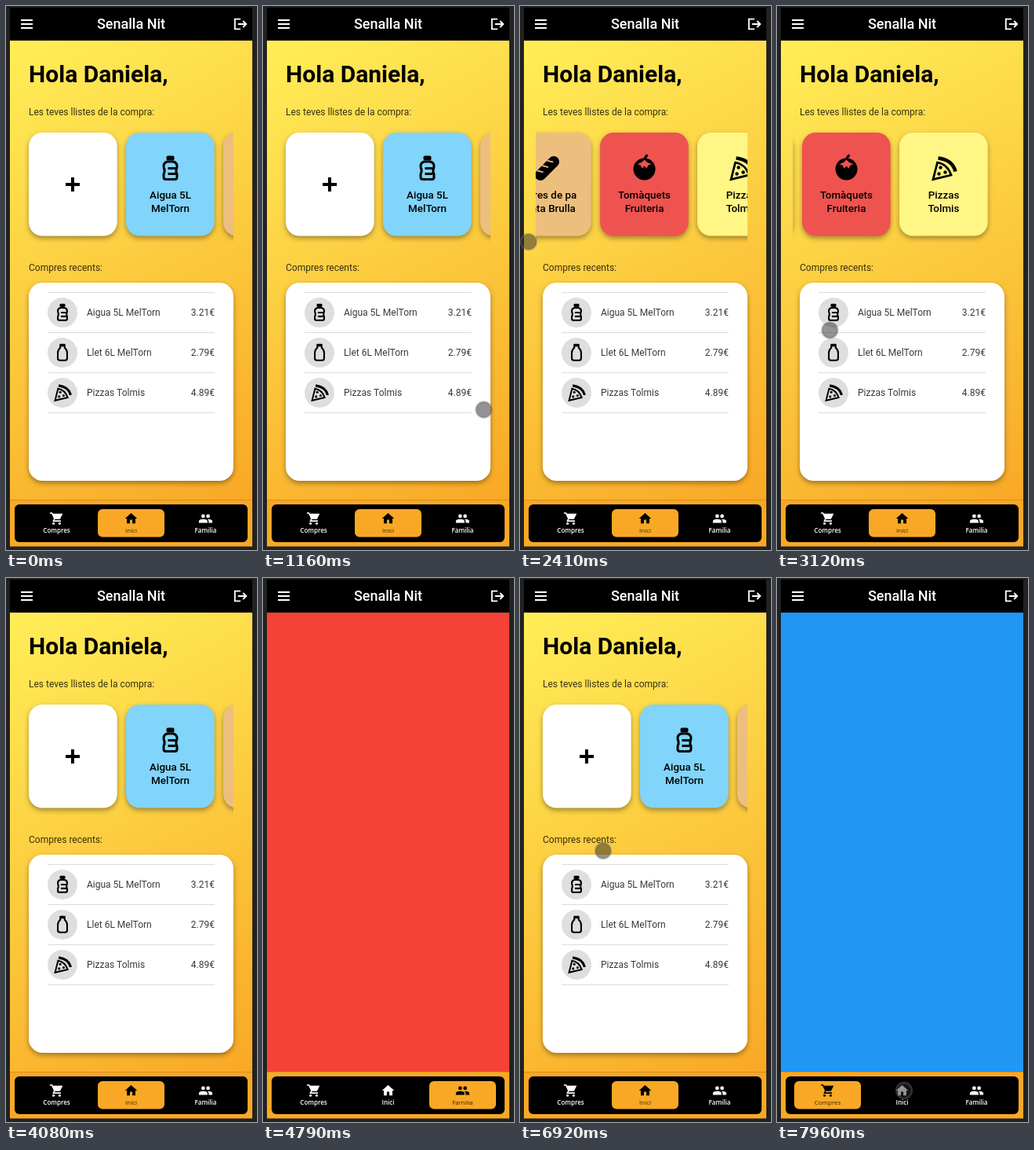
Animation, 320 px wide and 692 px high, one loop 8 s. Source, as an HTML page with a canvas:

```html
<!DOCTYPE html>
<html lang="ca">
<head>
<meta charset="utf-8">
<title>Llista de la compra</title>
<style>
  html, body { margin: 0; width: 100%; height: 100%; overflow: hidden; background: #222; }
  canvas { display: block; width: 100vw; height: 100vh; }
</style>
</head>
<body>
<canvas id="stage"></canvas>
<script>
const W = 320, H = 692, LOOP = 8000;
const LEFT = 5, TOP = 44, PAGE_W = 309, PAGE_H = 584;
const AMBER = '#f9a825', INK = 'rgba(0,0,0,.78)';
const SMALL = '12px Roboto, sans-serif';
const canvas = document.getElementById('stage');
const ctx = canvas.getContext('2d');
const dpr = window.devicePixelRatio || 1;
canvas.width = W * dpr;
canvas.height = H * dpr;

// Interface icons, drawn in a 24 px box
const ICONS = {
  cart() {
    stroke('M1 3H4.3L8.6 12L6.8 16H19', 2);
    fill('M5 4H22L17.5 13H8.6Z');
    dot(7, 20, 2);
    dot(17, 20, 2);
  },
  home() { fill('M10 20V14H14V20H19V12H22L12 3L2 12H5V20Z'); },
  people() {
    dot(8, 8, 3);
    dot(16, 8, 3);
    fill('M1 19V16.5Q1 13 8 13T15 16.5V19Z');
    fill('M17 19V16.5Q17 14.5 15 13Q23 13 23 16.5V19Z');
  },
  exit() {
    stroke('M12 4H3V20H12', 2.4);
    stroke('M8 12H20M16 7L21 12L16 17', 2.4);
  },
  menu() { stroke('M3 6H21M3 12H21M3 18H21', 2.2); }
};

// Product drawings, centred on 0,0 in a 32 px box
const PRODUCTS = {
  water() {
    rounded(-5, -16, 10, 6, 2, '#000');
    mirrored('M0-8.5H-4Q-8.500-7-8.500-3Q-8.500 0-7.500 1V5Q-8.500 6-8.500 8V11Q-8.500 14-5.500 14H0');
    stroke('M-3 0H7M-3 7H7', 3);
  },
  milk() {
    rounded(-5.5, -16, 11, 5, 2, '#000');
    mirrored('M-4-12V-9Q-8.500-5-8.500 0V10Q-8.500 14-4.500 14H0');
  },
  pizza() {
    stroke('M-7-13Q11-11 15 4', 4.5);
    stroke('M-8-7.500Q5-5 9.500 8.500L-13.500 14Z', 2.8);
    dot(-4, -1, 2.2);
    dot(2, 5, 2.2);
    dot(-6, 7, 2.2);
  },
  bread(back) {
    ctx.rotate(-Math.PI / 4);
    rounded(-19, -7, 38, 14, 7, '#000');
    ctx.strokeStyle = back;
    for (let x = -9; x <= 9; x += 9) stroke(`M${x - 2}-7L${x + 2} 0`, 1.8);
  },
  tomato(back) {
    dot(0, 1, 14);
    stroke('M0-9Q0-14 4-17', 3);
    ctx.fillStyle = back;
    fill('M-9-5L-3-8L0-11L3-8L9-5L5-4L3 0L0-3L-3 0L-5-4Z');
  }
};

const CARDS = [
  { color: '#fff' },
  { color: '#81d4fa', icon: 'water', lines: ['Aigua 5L', 'MelTorn'] },
  { color: '#edbf7f', icon: 'bread', lines: ['Barres de pa', 'Santa Brulla'] },
  { color: '#ef5350', icon: 'tomato', lines: ['Tomàquets', 'Fruiteria'] },
  { color: '#fff685', icon: 'pizza', lines: ['Pizzas', 'Tolmis'] }
];
const RECENT = [
  ['water', 'Aigua 5L MelTorn', '3.21€'],
  ['milk', 'Llet 6L MelTorn', '2.79€'],
  ['pizza', 'Pizzas Tolmis', '4.89€']
];
const TABS = [['cart', 'Compres'], ['home', 'Inici'], ['people', 'Familia']];

// Moves: start, duration, then the values to reach
const SCROLL = [[1560, 150, 80], [2010, 790, 369], [3620, 460, 0]];
const PAGE = [[4340, 450, 2], [6190, 450, 1], [7020, 450, 0]];
const TOUCHES = [
  { from: [282, 516], end: 3620, moves: [
    [1160, 190, 235, 283], [1560, 150, 140, 279], [2010, 240, 11, 300],
    [2960, 160, 67, 412], [3120, 360, 129, 483]] },
  { from: [303, 340], end: 4640, moves: [[4340, 250, 11, 345]] },
  { from: [11, 342], end: LOOP, moves: [
    [5340, 800, 180, 342], [6190, 250, 309, 345], [6600, 320, 106, 347],
    [7020, 250, 309, 335], [7480, 340, 186, 625], [7820, 140, 162, 652]] }
];

const easeOut = u => 1 - (1 - u) ** 2;

function glide(from, moves, t) {
  return moves.reduce((now, [start, time, ...to]) => {
    const u = easeOut(Math.min(1, Math.max(0, (t - start) / time)));
    return now.map((v, i) => v + (to[i] - v) * u);
  }, from);
}

function rect(x, y, w, h, color) {
  ctx.fillStyle = color;
  ctx.fillRect(x, y, w, h);
}

function rounded(x, y, w, h, r, color) {
  ctx.fillStyle = color;
  ctx.beginPath();
  ctx.roundRect(x, y, w, h, r);
  ctx.fill();
}

function panel(x, y, w, h, color) {
  ctx.save();
  ctx.shadowColor = 'rgba(0,0,0,.36)';
  ctx.shadowBlur = 6 * dpr;
  ctx.shadowOffsetY = 3 * dpr;
  rounded(x, y, w, h, 17.5, color);
  ctx.restore();
}

function dot(x, y, r) {
  ctx.beginPath();
  ctx.arc(x, y, r, 0, 7);
  ctx.fill();
}

function fill(path) {
  ctx.fill(new Path2D(path));
}

function stroke(path, width) {
  ctx.lineWidth = width;
  ctx.stroke(new Path2D(path));
}

function mirrored(path) {
  stroke(path, 3);
  ctx.scale(-1, 1);
  stroke(path, 3);
  ctx.scale(-1, 1);
}

function sprite(drawing, x, y, scale, origin, color, back) {
  ctx.save();
  ctx.translate(x, y);
  ctx.scale(scale, scale);
  ctx.translate(-origin, -origin);
  ctx.fillStyle = ctx.strokeStyle = color;
  drawing(back);
  ctx.restore();
}

function icon(name, x, y, scale, color) {
  sprite(ICONS[name], x, y, scale, 12, color);
}

function product(name, x, y, scale, back) {
  sprite(PRODUCTS[name], x, y, scale, 0, '#000', back);
}

function label(str, x, y, font, color = '#000', align = 'left') {
  ctx.font = font;
  ctx.fillStyle = color;
  ctx.textAlign = align;
  ctx.fillText(str, x, y);
}

function drawCard(card, x) {
  const mid = x + 56.5;
  panel(x, 161, 112.7, 131.6, card.color);
  if (!card.icon) {
    rect(mid - 9.5, 225, 18, 4, '#000');
    rect(mid - 2.5, 218, 4, 18, '#000');
    return;
  }
  product(card.icon, mid, 206.5, 1, card.color);
  card.lines.forEach((s, i) =>
    label(s, mid, 245 + 17 * i, '500 13.4px Roboto, sans-serif', '#000', 'center'));
}

function drawRow([name, text, price], i) {
  const y = 390 + 51 * i;
  ctx.fillStyle = '#dedede';
  dot(72, y, 19);
  product(name, 72, y, 0.7);
  label(text, 103, y + 4, SMALL, INK);
  label(price, 266, y + 4, SMALL, INK, 'right');
}

function drawHome(scroll) {
  const glow = ctx.createLinearGradient(LEFT, TOP, LEFT + PAGE_W, TOP + PAGE_H);
  glow.addColorStop(0, '#ffee58');
  glow.addColorStop(1, AMBER);
  rect(LEFT, TOP, PAGE_W, PAGE_H, glow);

  label('Hola Daniela,', 29, 97, 'bold 30px Roboto, sans-serif');
  label('Les teves llistes de la compra:', 29, 139, SMALL, INK);
  label('Compres recents:', 29, 337, SMALL, INK);

  ctx.save();
  ctx.beginPath();
  ctx.rect(20, 153, 270, 149);
  ctx.clip();
  CARDS.forEach((card, i) => drawCard(card, 29 + 124 * i - scroll));
  ctx.restore();

  panel(29, 352, 261, 252, '#fff');
  for (let i = 0; i < 4; i++) rect(53, 364 + 51 * i, 213, 1, '#dcdcdc');
  RECENT.forEach(drawRow);
}

function drawPages(page, scroll) {
  ctx.save();
  ctx.beginPath();
  ctx.rect(LEFT, TOP, PAGE_W, PAGE_H);
  ctx.clip();
  for (let i = 0; i < 3; i++) {
    ctx.save();
    ctx.translate((i - page) * PAGE_W, 0);
    if (i === 1) drawHome(scroll);
    else rect(LEFT, TOP, PAGE_W, PAGE_H, i ? '#f44336' : '#2196f3');
    ctx.restore();
  }
  ctx.restore();
}

function drawHeader() {
  rect(LEFT, 2, PAGE_W, TOP - 2, '#000');
  icon('menu', 26.5, 23, 0.83, '#fff');
  label('Senalla Nit', 159.5, 29, '500 18px Roboto, sans-serif', '#fff', 'center');
  icon('exit', 299, 23, 0.8, '#fff');
}

function drawTabs(active) {
  rect(LEFT, 628, PAGE_W, 59.5, AMBER);
  rect(LEFT, 628, PAGE_W, 1, 'rgba(0,0,0,.14)');
  rounded(11, 634, 297, 48, 6, '#000');
  TABS.forEach(([name, text], i) => {
    const on = i === active, x = 64.5 + 95 * i;
    if (on) rounded(x - 42.5, 640, 85, 35.6, 6, AMBER);
    icon(name, x, 652, 0.78, on ? '#000' : '#fff');
    label(text, x, 670, `${on ? 400 : 600} 8px "Open Sans", sans-serif`, on ? INK : '#fff', 'center');
  });
}

function drawTouch(t) {
  const touch = TOUCHES.find(({ moves, end }) => t > moves[0][0] && t < end);
  if (!touch) return;
  const [x, y] = glide(touch.from, touch.moves, t);
  const held = t >= 1560 && t < 2250;
  ctx.fillStyle = held ? 'rgba(160,174,52,.9)' : 'rgba(40,40,40,.5)';
  dot(x, y, 10);
  ctx.lineWidth = 2.4;
  ctx.strokeStyle = held ? 'rgba(140,168,100,.6)' : 'rgba(110,110,110,.4)';
  ctx.stroke();
}

function draw(t) {
  ctx.setTransform(dpr, 0, 0, dpr, 0, 0);
  rect(0, 0, W, H, '#222');
  const [page] = glide([1], PAGE, t);
  const [scroll] = glide([0], SCROLL, t);
  drawPages(page, scroll);
  drawHeader();
  drawTabs(Math.round(page));
  drawTouch(t);
}

const start = performance.now();
function tick() {
  draw((performance.now() - start) % LOOP);
  requestAnimationFrame(tick);
}
tick();
</script>
</body>
</html>
```
